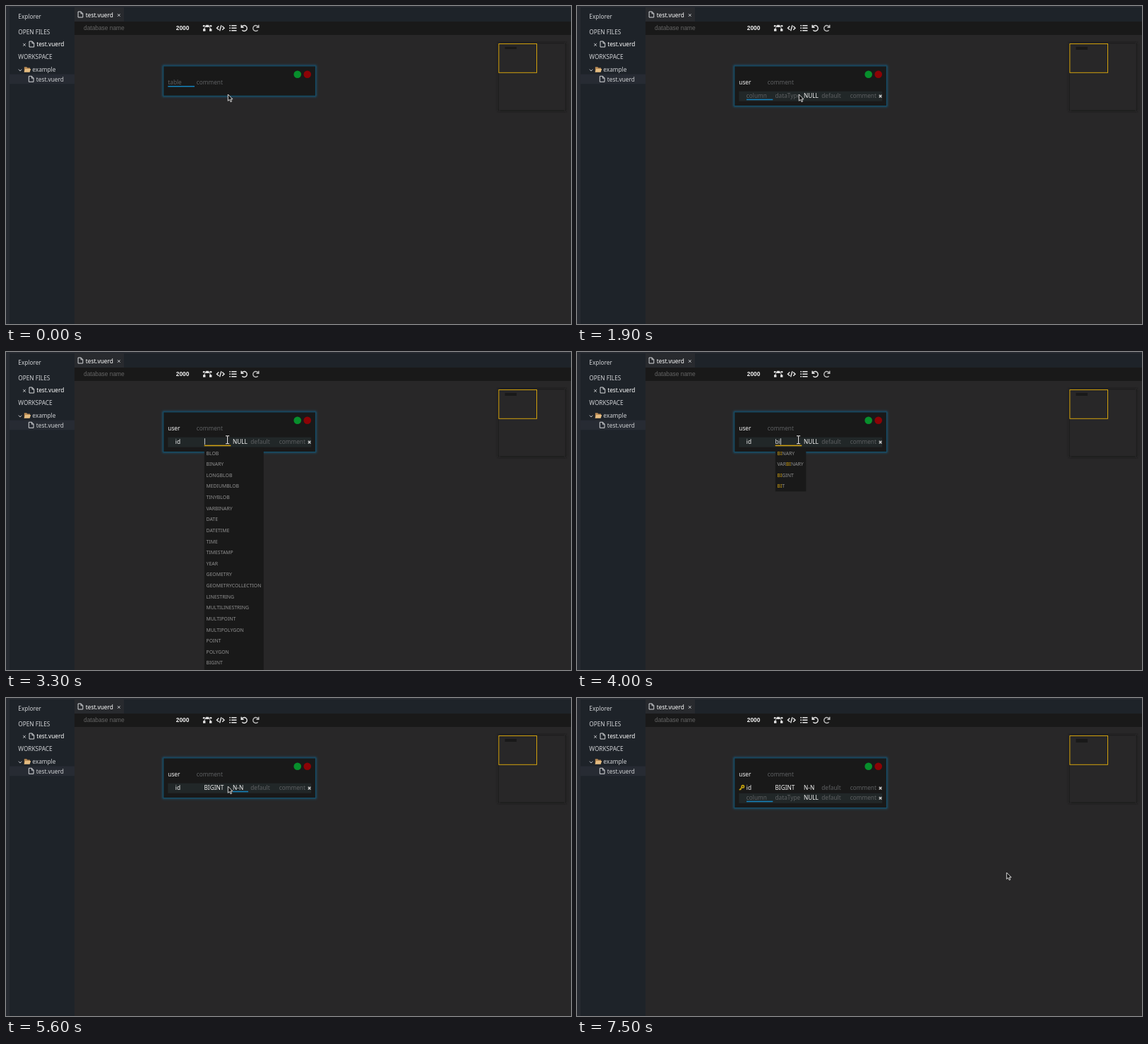
These frames come from a looping animation (800x450 px, 8 s). An HTML page:

```html
<!DOCTYPE html>
<html lang="en">
<head>
<meta charset="utf-8">
<title>Table editor</title>
<style>
  html, body { margin: 0; width: 100%; height: 100%; overflow: hidden; background: #282728; }
  svg { display: block; width: 100vw; height: 100vh; font-family: "Noto Sans", "Open Sans", sans-serif; }
  .bar { font-family: "Liberation Sans", Arial, sans-serif; font-size: 8.4px; }
</style>
</head>
<body>
<svg viewBox="0 0 800 450" preserveAspectRatio="none" font-size="8.25">
  <defs>
    <filter id="glow" x="-10%" y="-30%" width="120%" height="160%"><feGaussianBlur stdDeviation="1.6"/></filter>
    <g id="file" fill="none" stroke="#d5d7da" stroke-width="1">
      <path d="M-3.2-4H1L3.5-1.4V4H-3.2ZM.8-4V-1.2H3.5"/>
    </g>
    <path id="cross" d="M-1.8-1.8 1.8 1.8M1.8-1.8-1.8 1.8"/>
    <path id="arrow" d="M0 0V9.3L2.2 7.3 3.8 10.7 5.3 10 3.8 6.8H6.7Z" fill="#111" stroke="#eee" stroke-width=".9"/>
    <g id="beam" fill="none">
      <path d="M-2.6-5.5H-.7L0-5 .7-5.5H2.6M0-5V5M-2.6 5.5H-.7L0 5 .7 5.5H2.6" stroke="#111" stroke-width="2.5"/>
      <path d="M-2.6-5.5H-.7L0-5 .7-5.5H2.6M0-5V5M-2.6 5.5H-.7L0 5 .7 5.5H2.6" stroke="#eee" stroke-width="1.1"/>
    </g>
    <g id="key" fill="none" stroke="#c9a50d">
      <circle cx="234.8" cy="125.3" r="1.7" stroke-width="1.6"/>
      <path d="M233.5 126.6 229.8 130.2M231.3 128.8 232.4 129.9" stroke-width="1.5"/>
    </g>
  </defs>

  <rect width="800" height="450" fill="#272a31"/>
  <rect x="5" y="2" width="92" height="448" fill="#1e2329"/>
  <rect x="97" y="2" width="703" height="20" fill="#1e2329"/>
  <rect x="97" y="2" width="70" height="20" fill="#282a2e"/>
  <rect x="97" y="22" width="703" height="19" fill="#191919"/>
  <rect x="97" y="41" width="703" height="409" fill="#282728"/>
  <rect x="5" y="96.5" width="92" height="13.8" fill="#272b33"/>

  <g fill="#d0d2d5">
    <text x="17.3" y="17.6">Explorer</text>
    <text x="17.3" y="39.5">OPEN FILES</text>
    <text x="43.2" y="57.2" fill="#fff">test.vuerd</text>
    <text x="17.3" y="75.2">WORKSPACE</text>
    <text x="37.3" y="92.7">example</text>
    <text x="42.8" y="106.5">test.vuerd</text>
    <text x="112.8" y="15.8" fill="#fff">test.vuerd</text>
  </g>
  <use href="#file" x="36.2" y="54"/>
  <use href="#file" x="35.5" y="103.3"/>
  <use href="#file" x="105.3" y="12"/>
  <g stroke="#c4c6c9" fill="none">
    <use href="#cross" x="26" y="54.8"/>
    <use href="#cross" x="159.8" y="13"/>
    <path d="M17.8 89.6 20 92 22.2 89.6"/>
  </g>
  <path d="M25.8 93.5V86.3H29.3L30.3 87.5H34V89" fill="#b98a54"/>
  <path d="M25.6 93.8 27.2 89H35.2L33.6 93.8Z" fill="#e5bd82"/>

  <text class="bar" x="110" y="34.4" fill="#656565">database name</text>
  <text class="bar" x="240.8" y="34.4" fill="#eee" font-weight="bold">2000</text>
  <g fill="none" stroke="#e8e8e8" stroke-width="1.4">
    <path d="M280 28.2H290M283.5 28.5Q280.5 30 280.5 34M286.5 28.5Q289.8 30 289.8 34" stroke-width="1"/>
    <path d="M301.3 28.6 298.5 31.2 301.3 33.8M306.2 28.6 309 31.2 306.2 33.8M304.9 27.3 302.6 35.2"/>
    <path d="M319.2 27.8H326.5M319.2 31.3H326.5M319.2 34.8H326.5M316.3 27.8H318M316.3 31.3H318M316.3 34.8H318"/>
    <path d="M334 29.2A4 4 0 1 1 334.3 34.3M333.2 26.8V30.2H336.6"/>
    <path d="M357 29.2A4 4 0 1 0 356.7 34.3M357.8 26.8V30.2H354.4" stroke="#bdbdbd"/>
  </g>
  <g fill="#e8e8e8">
    <rect x="283.2" y="26.8" width="3.6" height="3.2"/>
    <rect x="279" y="32.4" width="3.4" height="3.2"/>
    <rect x="288" y="32.4" width="3.4" height="3.2"/>
    <circle cx="280" cy="28.2" r="1.2"/><circle cx="290.2" cy="28.2" r="1.2"/>
  </g>

  <rect x="697.5" y="53" width="95" height="95" fill="none" stroke="#1b1b1b" stroke-width="2" filter="url(#glow)"/>
  <rect x="698" y="53.5" width="93.5" height="93.5" fill="#282728"/>
  <rect id="mini" x="706.5" y="57.8" width="16.5" height="3.2" fill="#191919"/>
  <rect x="697.8" y="53.5" width="53.7" height="40.8" fill="none" stroke="#d3a20d"/>

  <g id="live"></g>
</svg>
<script>
const LOOP = 8000, STEP = 100;
const BLUE = '#1583bd', GOLD = '#d6a512', DIM = '#5e6062', WHITE = '#f4f4f4';
const TYPES = ('BLOB BINARY LONGBLOB MEDIUMBLOB TINYBLOB VARBINARY DATE DATETIME TIME TIMESTAMP YEAR ' +
  'GEOMETRY GEOMETRYCOLLECTION LINESTRING MULTILINESTRING MULTIPOINT MULTIPOLYGON POINT POLYGON ' +
  'BIGINT BIT BOOLEAN DECIMAL DOUBLE').split(' ');
const live = document.getElementById('live');
const mini = document.getElementById('mini');

const text = (x, y, s, fill, size = 8.25) =>
  `<text x="${x}" y="${y}" fill="${fill}" font-size="${size}">${s}</text>`;
const rect = (x, y, w, h, fill, more = '') =>
  `<rect x="${x}" y="${y}" width="${w}" height="${h}" fill="${fill}" ${more}/>`;
const line = (x, y, w, color) => rect(x, y, w, 1.5, color);
const use = (id, x, y) => `<use href="#${id}" x="${x}" y="${y}"/>`;

// Latest value whose start time has passed.
const at = (t, keys) => keys.reduce((v, [start, value]) => t >= start ? value : v, '');

// A field: placeholder, then typed text while editing, then its value.
function field(t, x, y, hint, open, keys, close) {
  const value = at(t, keys);
  const editing = t >= open && t < close;
  if (!editing) return text(x, y, value || hint, value ? WHITE : DIM);
  const last = keys.reduce((v, [start]) => t >= start ? start : v, open);
  const caret = (t - last) % 1000 < 500;
  const width = { u: 5.1, us: 9, user: 17.1, i: 2.1, id: 7.2, b: 5.1, bi: 7.2 }[value] || 0;
  return text(x, y, value, '#e2e2e2') + (caret ? rect(x + width + .4, y - 7.4, .9, 9, '#ddd') : '');
}

function row(y, t, name, type, nil) {
  return name + type + text(321, y, nil, WHITE) + text(346.3, y, 'default', DIM) +
    text(386.8, y, 'comment', DIM) + `<g stroke="#d0d0d0" stroke-width="1.4">${use('cross', 429.6, y - 2)}</g>`;
}

function hints(t) {
  const query = at(t, [[3700, 'B'], [4000, 'BI']]);
  const picked = at(t, [[4300, 'BINARY'], [4500, 'VARBINARY'], [4800, 'BIGINT']]);
  const width = { '': 84, B: 53, BI: 43.5 }[query];
  const found = TYPES.filter(s => s.includes(query));
  const gap = 15.63;
  let out = rect(280.8, 134.8, width, found.length * gap, '#191919');
  found.forEach((s, i) => {
    const on = s === picked;
    if (on) out += rect(280.8, 134.8 + i * gap, width, gap, '#373737');
    const label = on || !query ? s : s.replace(query, `<tspan fill="${GOLD}">${query}</tspan>`);
    out += text(283.5, 145.5 + i * gap, label, on ? '#f0f0f0' : '#929292', 6.9);
  });
  return out;
}

function underline(t) {
  if (t < 1900) return line(229.3, 113, 37.7, t >= 500 && t < 1400 ? GOLD : BLUE);
  if (t < 2800) return line(240, 131.7, 37.3, t >= 2100 && t < 2500 ? GOLD : BLUE);
  if (t < 5400) return line(280.7, 131.7, 37.6, t >= 3000 && t < 5000 ? GOLD : BLUE);
  if (t < 7400) return line(321, 131.7, 22, BLUE);
  return line(240, 145.7, 37.3, BLUE);
}

function pointer(t) {
  if (t >= 3000 && t < 5000) return use('beam', 313.6, 124.3);
  if (t < 7000) return use('arrow', 314.3, 125);
  return t < 7100 ? use('arrow', 490, 198) : use('arrow', 608.3, 247);
}

function draw(t) {
  const rows = t < 1900 ? 0 : t < 7400 ? 1 : 2;
  const height = [42.4, 56.6, 70.6][rows];
  const frame = `x="222.8" y="84.9" width="215.6" height="${height}"`;
  let out = `<rect ${frame} fill="none" stroke="#14587a" stroke-width="2.4" filter="url(#glow)"/>` +
    `<rect ${frame} fill="#191919" stroke="#14506c"/>` +
    '<circle cx="412.7" cy="96.8" r="5.3" fill="#078f2c"/><circle cx="426.7" cy="96.8" r="5.3" fill="#8c0306"/>' +
    field(t, 229.3, 110.6, 'table', 500, [[1000, 'u'], [1100, 'us'], [1200, 'user']], 1400) +
    text(269.8, 110.6, 'comment', DIM);

  if (rows) {
    out += rect(229.2, rows === 1 ? 120.7 : 134.8, 203, 14, '#212728');
    const name = field(t, 239.8, 129.6, 'column', 2100, [[2300, 'i'], [2400, 'id']], 2500);
    const type = field(t, 280.5, 129.6, 'dataType', 3000, [[3700, 'b'], [4000, 'bi'], [5000, 'BIGINT']], 5000);
    out += row(129.6, t, name, type, t < 5600 ? 'NULL' : 'N-N');
  }
  if (rows === 2)
    out += row(143.7, t, text(239.8, 143.7, 'column', DIM), text(280.5, 143.7, 'dataType', DIM), 'NULL');
  if (t >= 6300) out += '<use href="#key"/>';
  out += underline(t);
  if (t >= 3000 && t < 5000) out += hints(t);
  live.innerHTML = out + pointer(t);
  mini.setAttribute('height', 3.2 + rows);
}

let shown = -1, begin;
function tick(now) {
  begin ??= now;
  const t = Math.floor((now - begin) % LOOP / STEP) * STEP;
  if (t !== shown) draw(shown = t);
  requestAnimationFrame(tick);
}
draw(0);
requestAnimationFrame(tick);
</script>
</body>
</html>
```
